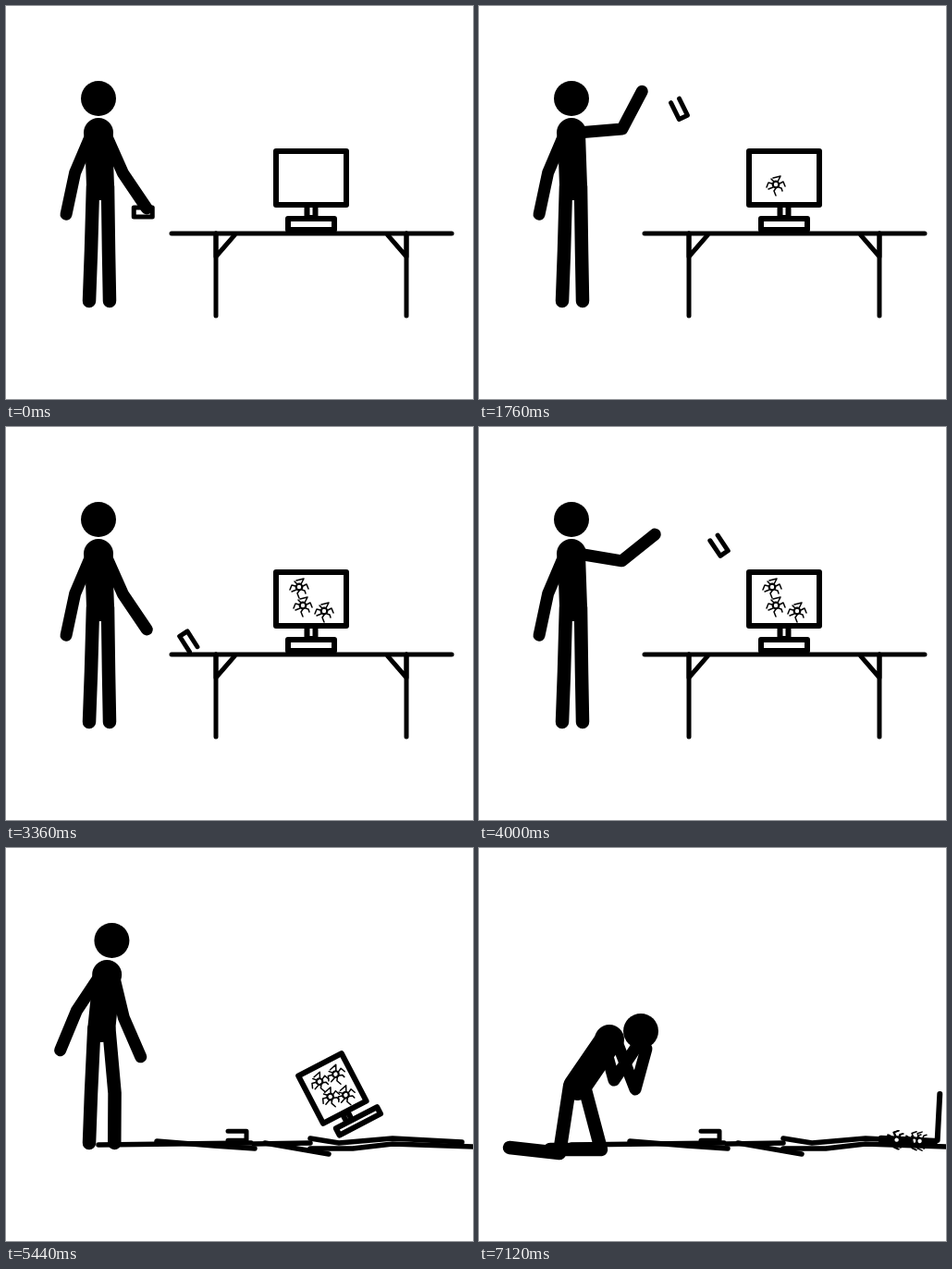
An HTML page with a canvas that plays this animation: 505x425 px, repeating every 7200 ms.

```html
<!DOCTYPE html>
<html lang="en">
<head>
<meta charset="utf-8">
<title>Desk rage</title>
<style>
html, body { margin: 0; width: 100%; height: 100%; overflow: hidden; background: #fff; }
canvas { display: block; }
</style>
</head>
<body>
<canvas id="stage" width="505" height="425"></canvas>
<script>
const ctx = document.getElementById('stage').getContext('2d');
const LOOP = 7200, STEP = 80, CATCH = 320, RAD = Math.PI / 180;

// time of impact and the point hit on the screen
const THROWS = [[800, 320, 193], [2000, 343, 199], [3120, 316, 173], [4160, 344, 174]]
  .map(([at, x, y]) => ({ at, x, y }));
const LAST = THROWS[3];
const CRACK = new Path2D('M2-3 5-9-3-7M4-1 8-3 10 2M3 3 6 4 7 7M0 4-2 7 0 12M-3 3-8 5M-4-1-8-2-10 3M-2-3-5-6');
const DEBRIS = [
  [100,321, 265,319], [163,317, 225,322, 269,325],
  [268,320, 329,319], [280,319, 349,331],
  [329,314, 360,319, 418,314, 493,318], [329,325, 375,325, 418,320, 507,323]
];

const ramp = (t, a, b) => Math.min(1, Math.max(0, (t - a) / (b - a)));
const smooth = k => k * k * (3 - 2 * k);
const mix = (a, b, k) => a.map((v, i) => v + (b[i] - v) * k);
const polar = ([x, y], deg, len) => [x + len * Math.cos(deg * RAD), y + len * Math.sin(deg * RAD)];

function line(points, width, close) {
  const p = points.flat();
  ctx.beginPath();
  for (let i = 0; i < p.length; i += 2) ctx.lineTo(p[i], p[i + 1]);
  if (close) ctx.closePath();
  ctx.lineWidth = width;
  ctx.stroke();
}

function disc(x, y, r, color = '#000') {
  ctx.fillStyle = color;
  ctx.beginPath();
  ctx.arc(x, y, r, 0, 7);
  ctx.fill();
}

// a box centred on x, y
function box(x, y, w, h) {
  ctx.fillStyle = '#fff';
  ctx.lineWidth = 6;
  ctx.beginPath();
  ctx.rect(x - w / 2, y - h / 2, w, h);
  ctx.fill();
  ctx.stroke();
}

function placed(x, y, deg, paint) {
  ctx.save();
  ctx.translate(x, y);
  ctx.rotate(deg * RAD);
  paint();
  ctx.restore();
}

// Poses: head, shoulder, hip, then elbow, hand, elbow, hand, knee, foot, knee, foot
function stand(lean, lift) {
  const x = 100 + 7 * lean, swing = 8 * lean;
  const back = polar([x - 7, 137], 113 + swing, 47);
  const front = polar([x + 7, 137], 66 + swing - 73 * lift, 48);
  return [
    [100 + 11 * lean, 100], [x, 137], [102 + lean, 195],
    back, polar(back, 102 + swing, 46),
    front, polar(front, 56 + swing - 122 * lift, 46),
    [92, 265], [90, 319], [111 + 5 * lean, 265], [112 + 4 * lean, 319]
  ];
}

function kneel(sob) {
  const up = (x, y) => [x - 7 * sob, y - 9 * sob];
  return [
    up(182, 207), up(148, 216), [106, 258],
    [146, 257 - 6 * sob], up(180, 220), [169, 268 - 7 * sob], up(188, 226),
    [87, 330], [33, 324], [132, 326], [77, 326]
  ];
}

function drawBody([head, shoulder, hip, ...limbs]) {
  const limb = ([x, y], dx, i, w) => line([[x + dx, y], limbs[i], limbs[i + 1]], w);
  disc(...head, 19);
  disc(...shoulder, 16);
  line([shoulder, hip], 30);
  limb(shoulder, -7, 0, 13);
  limb(shoulder, 7, 2, 13);
  limb(hip, -8, 4, 14.5);
  limb(hip, 8, 6, 14.5);
}

// how far the throwing arm is raised, h ms from impact
const armLift = h => 1.2 * (h < -400 ? smooth(ramp(h, -720, -400)) : 1 - ramp(h, -400, 80) ** 1.5);

function held(h) {
  const lift = armLift(h), [x, y] = stand(0, lift)[6];
  return [x - 4 + 2 * lift, y + 4 - 12 * lift, 66 * lift];
}

// x, y, angle of the thrown thing, h ms from impact
function flight(hit, h) {
  const impact = [hit.x - 10, hit.y - 2, 43];
  if (h < -320) return held(h);
  if (h < 0) return mix(held(-320), impact, ramp(h, -320, 0) ** 0.8);
  const k = ramp(h, 0, CATCH);
  const end = hit === LAST ? [229, 229, 253] : [148, 222, 360];
  const [x] = mix(impact, end, k ** 1.3);
  const [, y] = mix(impact, end, k);
  const [, , angle] = mix(impact, end, k ** 1.7);
  return [x, Math.min(232, y + 38 * Math.sin(Math.PI * k)), angle];
}

function drawThing(t, hit, drop) {
  const slide = ramp(t, 5120, 5440);
  const [x, y, angle] = flight(hit, t - hit.at);
  placed(x + 21 * slide, y + 0.95 * drop + 12 * slide, angle + 107 * slide, () =>
    line([-10,-5, 10,-5, 10,5, -10,5], 5, t < THROWS[0].at + CATCH));
}

// the feet slide outwards as the top sinks
function drawTable(drop) {
  const y = 246 + drop, sag = drop / 6;
  line([179,y - sag / 2, 285,y, 350,y + sag, 482,y - sag / 2], 5);
  const spread = drop ? Math.acos((335 - y) / 89) / RAD : 0;
  for (const [x, side] of [[227, 1], [433, -1]]) {
    const out = deg => side > 0 ? deg : 180 - deg;
    const joint = [x, y + 25];
    line([[x, y], polar([x, y], out(90 + spread), 89)], 5);
    line([[x, y], joint, polar(joint, out(-49 + 1.27 * spread), 31)], 5);
  }
}

function drawCrack(x, y) {
  placed(x, y, 0, () => {
    ctx.lineWidth = 1.5;
    ctx.stroke(CRACK);
    disc(0, 0, 4.4);
    disc(0, 0, 2.2, '#fff');
  });
}

// tips over to its side while turning edge-on
function drawMonitor(t, drop) {
  const tip = smooth(ramp(t, 5200, 5840)), thin = 1 - tip;
  const [x, y] = mix([330, 242 + 0.82 * drop], [497, 291], tip);
  const cx = -27 * tip, cy = -56 + 24 * tip;
  placed(x, y, -87 * tip, () => {
    box(cx, -20 * thin, 9 * thin, 14 * thin);
    box(0, -6 * thin, 50, 12 * thin);
    box(cx, cy, 76 * thin + 2 * tip, 58);
    for (const hit of THROWS)
      if (t >= hit.at) drawCrack(cx + (hit.x - 329) * thin, cy + hit.y - 186);
  });
}

function draw(t) {
  ctx.fillStyle = '#fff';
  ctx.fillRect(0, 0, 505, 425);
  ctx.strokeStyle = '#000';
  ctx.lineCap = ctx.lineJoin = 'round';

  const hit = THROWS.find(o => t < o.at + CATCH) || LAST;
  const sink = ramp(t, 4640, 5120), drop = 74 * sink;
  if (sink < 1) drawTable(drop);
  else DEBRIS.forEach(p => line(p, 5.5));
  drawMonitor(t, drop);

  const lean = ramp(t, 4800, 4880) + 0.4 * ramp(t, 4880, 5600);
  const sob = t > 6000 ? (1 - Math.cos((t - 6000) * Math.PI / 160)) / 2 : 0;
  const down = smooth(ramp(t, 5600, 5920)), knees = kneel(sob);
  drawBody(stand(lean, armLift(t - hit.at)).map((p, i) => mix(p, knees[i], down)));
  drawThing(t, hit, drop);
}

let start;
function tick(now) {
  start ??= now;
  draw(Math.floor((now - start) % LOOP / STEP) * STEP);
  requestAnimationFrame(tick);
}
draw(0);
requestAnimationFrame(tick);
</script>
</body>
</html>
```
